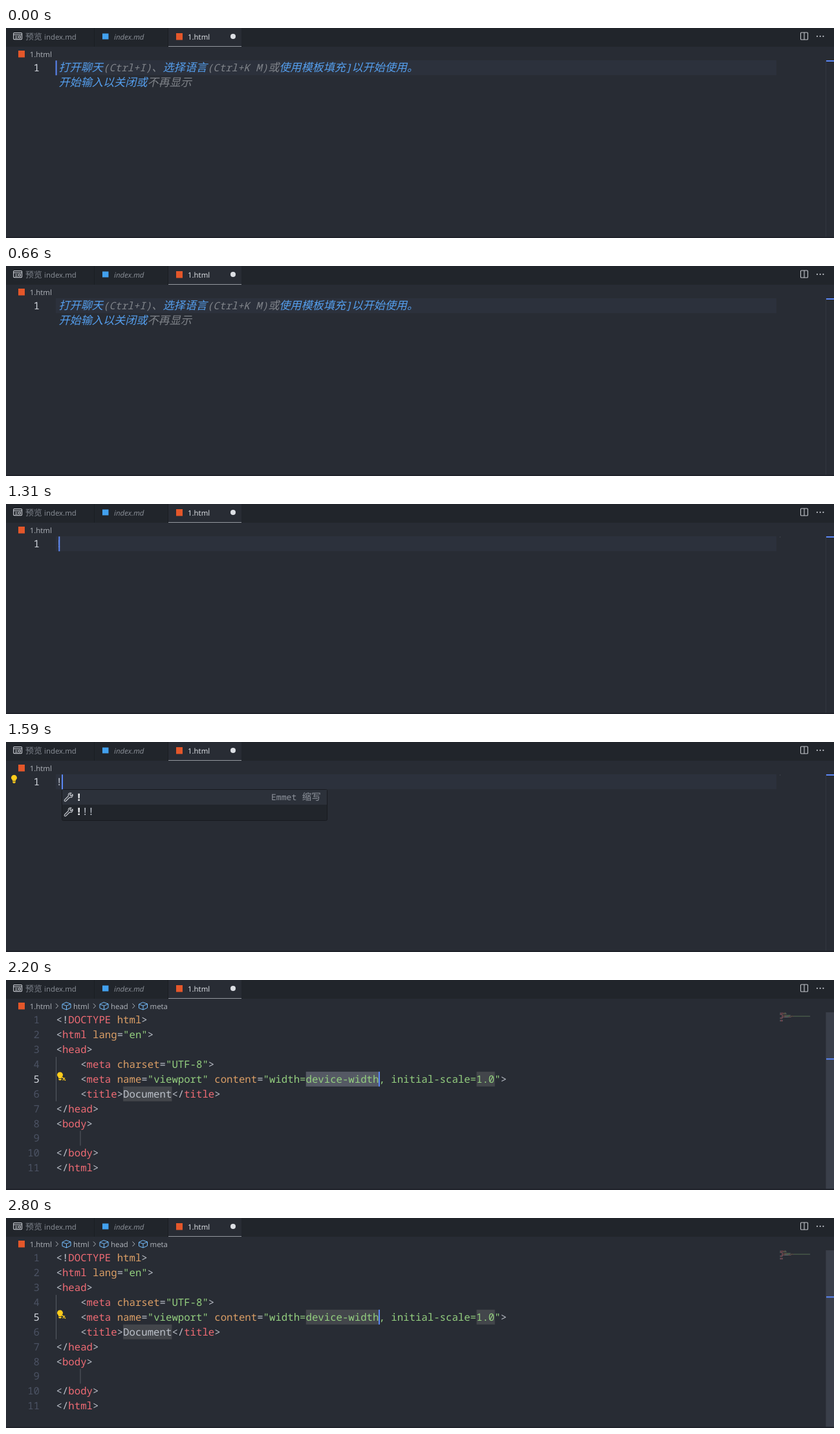
Animation, 1280 px wide and 325 px high, one loop 2880 ms. Source, as an HTML page:

```html
<!DOCTYPE html>
<html lang="zh">
<head>
<meta charset="utf-8">
<title>Editor</title>
<style>
html, body { margin: 0; width: 100%; height: 100%; overflow: hidden; background: #282c34; }
svg { display: block; width: 100%; height: 100%; text-rendering: geometricPrecision; }
text { white-space: pre; }
.ui { font: 11.45px "Open Sans", "Noto Sans", "Noto Sans CJK SC", "Noto Sans CJK", sans-serif; }
.mono { font: 15.7px "Noto Sans Mono", "Noto Sans CJK SC", "Noto Sans CJK", monospace; }
.cjk { font: 17.12px "Noto Sans CJK SC", "Noto Sans CJK", sans-serif; }
.slant { font-style: italic; }
</style>
</head>
<body>
<svg id="stage" viewBox="0 0 1280 325" preserveAspectRatio="none"></svg>
<script>
const LOOP = 2880;
const CHAR = 9.42, LINE = 22.9, LEFT = 77.5, TOP = 50.3;
const FG = '#bcc1ca', RED = '#ef6b74', ORANGE = '#dc9f66', GREEN = '#94cf7f';
const LINK = '#559fee', FAINT = '#7f8389', DIM = '#4b5263', BRIGHT = '#d0d4db';
const ICON = '#c5c8ce', CRUMB = '#b0b4bb', CARET = '#5b87f5';

const source = [
  '<!DOCTYPE html>',
  '<html lang="en">',
  '<head>',
  '    <meta charset="UTF-8">',
  '    <meta name="viewport" content="width=device-width, initial-scale=1.0">',
  '    <title>Document</title>',
  '</head>',
  '<body>',
  '',
  '</body>',
  '</html>'
];

const stage = document.getElementById('stage');
const esc = s => s.replace(/&/g, '&amp;').replace(/</g, '&lt;');
const colX = col => LEFT + col * CHAR;
const rowY = row => TOP + row * LINE;
const rect = (x, y, w, h, fill, more = '') =>
  `<rect x="${x}" y="${y}" width="${w}" height="${h}" fill="${fill}" ${more}/>`;
const text = (x, y, str, fill, cls = 'ui', more = '') =>
  `<text x="${x}" y="${y}" class="${cls}" fill="${fill}" ${more}>${esc(str)}</text>`;
const path = (d, stroke, width = 1, more = '') =>
  `<path d="${d}" fill="none" stroke="${stroke}" stroke-width="${width}" ${more}/>`;
const group = (id, body) => `<g id="${id}">${body}</g>`;

// Splits a line of markup into coloured tokens with their columns.
function tokens(line) {
  let prev = '', col = 0;
  return line.match(/"[^"]*"|<!|<\/|[\w-]+|\s+|./g)?.map(str => {
    let fill = FG;
    if (str[0] === '"') fill = GREEN;
    else if (/\w/.test(str)) fill = prev[0] === '<' ? RED : prev === '>' ? FG : ORANGE;
    if (str.trim()) prev = str;
    const token = { str, fill, col };
    col += str.length;
    return token;
  }) || [];
}

function lineNumber(row, fill) {
  return text(52, rowY(row) + 16.9, String(row + 1), fill, 'mono', 'text-anchor="end"');
}

function codeLine(line, row) {
  const spans = tokens(line).map(t => `<tspan fill="${t.fill}">${esc(t.str)}</tspan>`).join('');
  return `<text x="${LEFT}" y="${rowY(row) + 16.9}" class="mono">${spans}</text>`;
}

function minimap() {
  return source.map((line, row) => tokens(line).filter(t => t.str.trim()).map(t =>
    rect(1196.5 + t.col * 0.63, 50.6 + row * 1.26, t.str.length * 0.63, 0.9, t.fill, 'opacity=".45"')
  ).join('')).join('');
}

function slot(row, col, length) {
  return rect(colX(col), rowY(row), length * CHAR, LINE, '#43464b');
}

function cube(x) {
  return path(`M${x} 37.5l6-3 7 2.5v6l-6.5 3-6.5-2.5zm0 0l6.5 2.5 6.5-3M${x + 6.5} 40v6`,
    '#75beff', 1, 'stroke-linejoin="round"');
}

function wrench(y) {
  return path(`M90.5 ${y + 11.5}l6-6c-1-3 1.5-5.5 4.5-4.5l-2.5 2.5 2 2 2.5-2.5c1 3-1.5 5.5-4.5 4.5l-6 6c-1.5 1-3-.5-2-2z`,
    ICON, 1.1, 'stroke-linejoin="round"');
}

function bulb(x, y, spark = '') {
  return `<g transform="translate(${x} ${y})"><path d="M4.5 0C2 0 0 2 0 4.3c0 1.7 1 2.7 2 3.7v1.5h5V8c1-1 2-2 2-3.7C9 2 7 0 4.5 0z
    M2.3 10.3h4.4v1.5l-1 1h-2.4l-1-1z" fill="#ffcc1c"/>${spark}</g>`;
}

function chrome() {
  const tabs = rect(0, 0, 1280, 29, '#21252b') + rect(251, 0, 113, 29, '#282c34') +
    rect(136, 0, 1, 29, '#1b1e23') + rect(250, 0, 1, 29, '#1b1e23') +
    rect(251, 28, 113, 1, '#94989f');
  const preview = rect(11.6, 7.6, 13, 10, 'none', `rx="1" stroke="${ICON}" stroke-width="1.1"`) +
    path('M12 10.5h12.5M14 13h4M14 15.5h4', ICON) +
    rect(19.5, 12.6, 3, 2.8, 'none', `stroke="${ICON}"`);
  const labels =
    text(30, 17.7, '预览', '#7c818a', 'ui', 'style="font-size:12.9px"') +
    text(59, 17.7, 'index.md', '#8b9098') +
    rect(149, 8.5, 9.5, 9, '#42a0ee') +
    text(167, 17.7, 'index.md', '#8b9098', 'ui slant') +
    rect(263, 8, 10, 10.5, '#e4572a') +
    text(281, 17.7, '1.html', '#e2e5ea') +
    '<circle cx="351" cy="13" r="4" fill="#dcdfe4"/>';
  const tools = rect(1228.5, 7, 11, 11, 'none', `rx="1" stroke="${ICON}" stroke-width="1.1"`) +
    path('M1234 7v11', ICON, 1.1) +
    [1254, 1258.7, 1263.4].map(x => `<circle cx="${x}" cy="12.8" r="1.1" fill="${ICON}"/>`).join('');
  const file = rect(19, 35, 10, 10.5, '#e4572a') + text(36.7, 44.7, '1.html', CRUMB);
  return tabs + preview + labels + tools + file +
    rect(1267, 50, 1, 273, '#32363f') + rect(0, 323, 1280, 2, '#20232b');
}

function crumbs() {
  return [['html', 76], ['head', 134], ['meta', 194.5]].map(([name, x]) =>
    path(`M${x + 1} 36.5l3.5 3.7-3.5 3.7`, CRUMB) +
    cube(x + 11) + text(x + 28, 44.7, name, CRUMB)
  ).join('');
}

function hints() {
  const write = (y, parts) => {
    let x = 81.5;
    return parts.map(([str, fill]) => {
      const latin = str.charCodeAt(0) < 128;
      const out = text(x, y, str, fill, (latin ? 'mono' : 'cjk') + ' slant');
      x += str.length * (latin ? CHAR : 17.12);
      return out;
    }).join('');
  };
  return write(67.3, [['打开聊天', LINK], ['(Ctrl+I)', FAINT], ['、', FAINT], ['选择语言', LINK],
    ['(Ctrl+K M)', FAINT], ['或', FAINT], ['使用模板填充', LINK], [']', LINK], ['以开始使用。', LINK]]) +
    write(90.2, [['开始输入以关闭或', LINK], ['不再显示', FAINT]]);
}

function popup() {
  const mark = (x, y, str, fill, weight) => text(x, y, str, fill, 'mono', `style="font-weight:${weight}"`);
  return rect(86.5, 73.5, 410, 48, '#21252b', 'rx="2" stroke="#181a1f"') +
    rect(87, 74, 409, 23, '#2c313a') + wrench(78) + wrench(101) +
    mark(108, 90.5, '!', '#f0f2f5', 700) + mark(108, 113.3, '!', '#f0f2f5', 700) +
    mark(108 + CHAR, 113.3, '!!', FG, 400) +
    text(410, 90, 'Emmet', '#8e939c', 'mono', 'style="font-size:13.1px"') +
    text(457.7, 90, '缩写', '#8e939c', 'cjk', 'style="font-size:14.5px"');
}

function code() {
  const guide = '#565b63';
  return slot(4, 41, 12) +
    group('selection', rect(colX(41), rowY(4), 12 * CHAR, LINE, '#71778a', 'opacity=".4"')) +
    slot(4, 69, 3) + slot(5, 11, 8) +
    rect(77, rowY(3), 1, LINE * 3, guide) + rect(114.5, rowY(8), 1, LINE, guide) +
    source.map((line, row) => lineNumber(row, row === 4 ? BRIGHT : DIM) + codeLine(line, row)).join('') +
    minimap() + rect(1268, 50, 12, 273, '#3a3f4a') + rect(1268, 121.3, 12, 2, CARET);
}

const spark = path('M8 8l4.5 4.5M9 12l2.5-2.5', '#ffcc1c', 1.7, 'stroke-linecap="round"');

stage.innerHTML = chrome() +
  group('firstLine', rect(77, 50, 1114, 23, '#2c313c') + lineNumber(0, BRIGHT) +
    rect(1268, 50, 12, 2, CARET)) +
  group('hints', hints()) +
  group('typed', text(LEFT, 67.2, '!', FG, 'mono') + rect(1196.5, 50.6, 0.7, 0.9, FG, 'opacity=".5"')) +
  group('code', code()) +
  group('popup', popup()) +
  group('crumbs', crumbs()) +
  group('bulbTop', bulb(8, 51)) +
  group('bulbLine', bulb(79, 142.5, spark)) +
  rect(0, 0, 2, LINE, CARET, 'id="caret"');

const parts = Object.fromEntries([...stage.querySelectorAll('[id]')].map(el => [el.id, el]));

const span = {
  firstLine: [0, 1840], hints: [0, 1310], typed: [1310, 1840], popup: [1430, 1840],
  bulbTop: [1590, 2080], code: [1840, LOOP], bulbLine: [2080, LOOP],
  crumbs: [2200, LOOP], selection: [1840, 2800]
};

// Stepped tracks: [time, value], each value holds until the next time.
const blink = [[0, 1], [540, .7], [600, .3], [660, 0], [1150, .35], [1190, .7], [1230, 1],
  [2440, .8], [2480, .5], [2520, .2], [2560, 0], [2800, 1]];
const typeMove = [[0, 0], [1310, .5], [1350, 1]];
const jumpMove = [[0, 0], [1840, .488], [1880, .95], [1920, 1]];
const held = (track, t) => track.filter(k => k[0] <= t).pop()[1];

function draw(t) {
  for (const id in span) {
    const [from, to] = span[id];
    parts[id].style.display = t >= from && t < to ? '' : 'none';
  }
  const jump = held(jumpMove, t);
  const startX = 76.6 + CHAR * held(typeMove, t);
  parts.caret.setAttribute('x', startX + (colX(53) - 0.8 - startX) * jump);
  parts.caret.setAttribute('y', TOP + 4 * LINE * jump);
  parts.caret.setAttribute('opacity', held(blink, t));
}

const start = performance.now();
function tick() {
  draw((performance.now() - start) % LOOP);
  requestAnimationFrame(tick);
}
tick();
</script>
</body>
</html>
```
